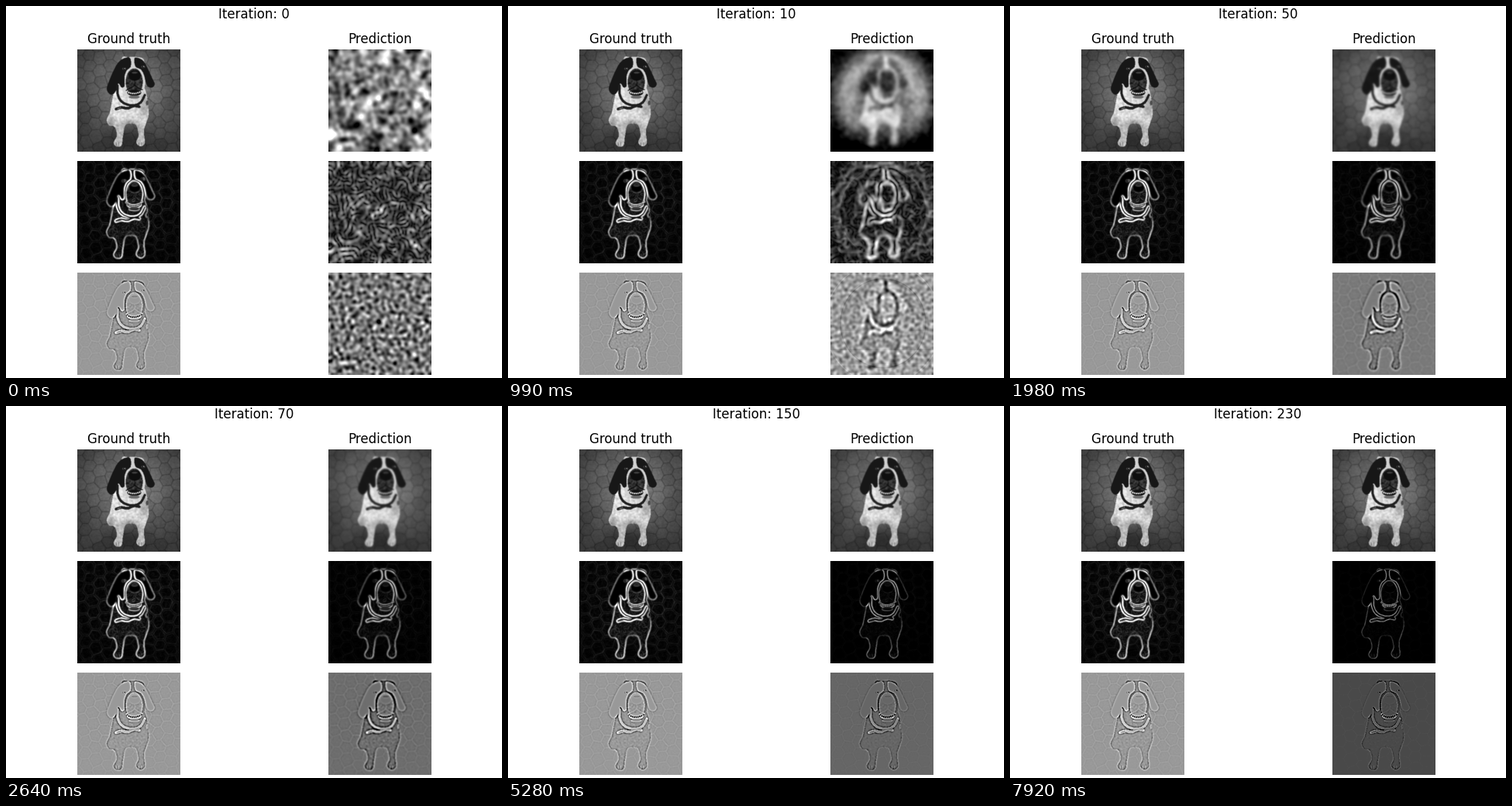
Recreate the animation shown at these times as a matplotlib script. Size 640x480 px, loop 8000 ms.

```python
import numpy as np
import matplotlib.pyplot as plt
from matplotlib.animation import FuncAnimation
from matplotlib.path import Path

W, H, LOOP, INTERVAL, STEP = 640, 480, 8000, 40, 330
N, SIDE = 264, 133          # samples and picture units per side
UNIT = N / SIDE
rng = np.random.default_rng(7)
axis = (np.arange(N) + 0.5) / UNIT
X, Y = np.meshgrid(axis, axis)
GRID = np.column_stack([X.ravel(), Y.ravel()])


def blur(a, sigma):
    """Gaussian blur, sigma in picture units, mirrored at the borders."""
    pad = 30
    b = np.pad(a, pad, mode="reflect")
    f = np.fft.fftfreq(b.shape[0])
    k = np.exp(-2 * (np.pi * f * sigma * UNIT) ** 2)
    b = np.fft.ifft2(np.fft.fft2(b) * np.outer(k, k)).real
    return b[pad:-pad, pad:-pad]


def noise(sigma):
    n = blur(rng.standard_normal((N, N)), sigma)
    return n / n.std()


def smooth(points, closed=True, steps=8):
    """Catmull-Rom curve through the points."""
    p = np.array(points, float)
    p = np.vstack([p[-1:], p, p[:2]]) if closed else np.vstack([p[:1], p, p[-1:]])
    t = np.linspace(0, 1, steps, endpoint=False)[:, None]
    parts = [b + 0.5 * t * (c - a + t * (2 * a - 5 * b + 4 * c - d
                                         + t * (3 * (b - c) + d - a)))
             for a, b, c, d in zip(p, p[1:], p[2:], p[3:])]
    return np.vstack(parts + [p[-2:-1]])


def region(points):
    return Path(smooth(points)).contains_points(GRID).reshape(N, N)


def oval(cx, cy, rx, ry):
    return ((X - cx) / rx) ** 2 + ((Y - cy) / ry) ** 2 < 1


def stroke(points, width):
    near = np.full((N, N), 1e9)
    for x, y in smooth(points, closed=False):
        near = np.minimum(near, (X - x) ** 2 + (Y - y) ** 2)
    return near < (width / 2) ** 2


def paving():
    """Irregular stones with dark joints under a vignette."""
    i, j = np.meshgrid(np.arange(-9, 14), np.arange(-9, 14))
    u = (i + 0.5 * (j % 2)) * 16 + rng.uniform(-3, 3, i.shape)
    v = j * 13 + rng.uniform(-2, 2, i.shape)
    c, s = np.cos(0.45), np.sin(0.45)
    px, py = (c * u - s * v).ravel(), (s * u + c * v).ravel()
    keep = (abs(px - 66) < 90) & (abs(py - 66) < 90)
    px, py = px[keep], py[keep]
    d = np.sqrt((X[..., None] - px) ** 2 + (Y[..., None] - py) ** 2)
    shade = rng.uniform(0.92, 1.08, px.size)[d.argmin(-1)]
    d = np.partition(d, 1, axis=-1)
    joint = np.exp(-((d[..., 1] - d[..., 0]) / 1.1) ** 2)
    light = 0.19 + 0.3 * np.exp(-((X - 70) / 62) ** 2 - ((Y - 52) / 58) ** 2)
    return light * (shade - 0.28 * joint + 0.035 * noise(0.6))


def paint_dog(img):
    speckle = noise(0.8)
    img *= 1 - 0.35 * np.exp(-((X - 68) / 26) ** 2 - ((Y - 118) / 16) ** 2)
    body = region([(50, 46), (46, 62), (42, 82), (38, 92), (41, 99), (48, 101),
                   (51, 112), (47, 121), (50, 126), (57, 125), (59, 113),
                   (62, 99), (69, 97), (76, 99), (79, 112), (76, 121),
                   (81, 126), (87, 122), (86, 106), (89, 96), (92, 85),
                   (91, 70), (86, 50), (70, 40)])
    coat = 0.87 - 0.2 * np.exp(-((X - 89) / 9) ** 2 - ((Y - 74) / 16) ** 2)
    coat -= 0.14 * np.clip((Y - 88) / 16, 0, 1)
    coat -= 0.3 * np.exp(-((X - 68) / 9) ** 2 - ((Y - 101) / 7) ** 2)
    coat -= 0.25 * np.exp(-((X - 43) / 5) ** 2 - ((Y - 95) / 7) ** 2)
    img[body] = (coat + 0.045 * speckle)[body]
    for x in (50, 53.5, 79.5, 83):
        img[stroke([(x, 121), (x, 125)], 0.7)] = 0.3
    img[oval(90, 70, 1.6, 3)] = 0.3

    img[region([(57, 14), (66, 11), (78, 11), (86, 15), (88, 38), (86, 53),
                (80, 63), (66, 63), (58, 52)])] = 0.82
    img[region([(68, 12), (59, 13), (52, 19), (46, 30), (41, 42), (38, 52),
                (41, 58), (46, 59), (50, 54), (53, 45), (57, 50), (61, 48),
                (61, 36), (64, 28), (69, 23)])] = 0.09
    img[region([(74, 12), (83, 14), (88, 20), (93, 30), (98, 41), (100, 46),
                (97, 50), (91, 49), (88, 42), (86, 34), (82, 27),
                (75, 23)])] = 0.09
    for x, y in ((60.5, 26), (85, 23.5)):
        img[oval(x, y, 2.6, 1.5)] = 0.27
        img[oval(x, y, 1.2, 1.2)] = 0.03
        img[oval(x + 0.5, y - 0.5, 0.6, 0.6)] = 0.85

    muzzle = oval(73.5, 43, 11, 17.5)
    img[muzzle] = (0.2 + 0.05 * speckle)[muzzle]
    img[oval(74, 34.5, 8, 7)] = 0.06
    img[oval(74, 31, 4, 1.2)] = 0.24
    img[stroke([(74, 40), (74, 47), (68, 51), (63, 54)], 1.1)] = 0.04
    img[stroke([(74, 47), (79, 51), (84, 53)], 1.1)] = 0.04
    img[oval(73.5, 57, 9, 4)] = 0.07
    for x in np.linspace(66.5, 80.5, 7):
        img[oval(x, 56.4 + 0.03 * (x - 73) ** 2 * -1 + 1.5, 0.95, 1.1)] = 0.92
    img[oval(73.5, 62.5, 7, 2.2)] = 0.42

    img[stroke([(52, 48), (52, 58), (56, 67), (64, 72), (74, 73), (82, 69),
                (87, 60)], 3.2)] = 0.12
    img[stroke([(50, 78), (57, 76), (65, 77), (73, 74), (80, 75)], 3.6)] = 0.13
    img[stroke([(52, 77.6), (56, 76.4)], 0.9)] = 0.6
    return img


def slope(a):
    gy, gx = np.gradient(a)
    return np.hypot(gx, gy)


def laplace(a):
    gy, gx = np.gradient(a)
    return np.gradient(gy)[0] + np.gradient(gx)[1]


def unit(a):
    return a / np.percentile(abs(a[3:-3, 3:-3]), 99.8)


def contrast(a, power):
    return np.sign(a) * abs(a) ** power


photo = np.clip(blur(paint_dog(paving()), 0.3), 0, 1)
truth = [photo,
         1.05 * unit(slope(blur(photo, 0.75))) ** 0.95,
         0.6 + 0.5 * contrast(unit(laplace(blur(photo, 0.5))), 1.15)]

static = noise(2.7) + 0.45 * noise(5)
start = [0.5 + 0.19 * static, 0.8 * unit(slope(static)),
         0.46 + 0.5 * unit(laplace(static))]
ripple = noise(2.2)
radius = np.hypot(X - 68, (Y - 66) * 0.95)
halo = 0.3 * np.exp(-((radius - 47) / 15) ** 2) * np.clip((125 - Y) / 50, 0, 1)
halo -= 0.22 * np.clip((radius - 55) / 20, 0, 1)
halo -= 0.14 * np.clip((Y - 100) / 20, 0, 1)

KEYS = [10, 20, 30, 70, 110, 150, 230]


def prediction(it):
    if it == 0:
        return start

    def at(*values):
        return np.interp(it, KEYS, values)

    guess = blur(photo, at(2.5, 1.9, 1.45, 0.9, 0.65, 0.48, 0.3))
    guess = guess + at(1, 0.3, 0, 0, 0, 0, 0) * halo
    guess = guess + at(0.035, 0.017, 0.008, 0.002, 0, 0, 0) * ripple
    edges = at(0.95, 0.85, 0.78, 0.72, 0.7, 0.68, 0.66) * contrast(
        unit(slope(guess)), at(1, 1, 1.05, 1.15, 1.25, 1.4, 1.6))
    bends = at(0.6, 0.56, 0.53, 0.43, 0.49, 0.4, 0.29) + at(
        0.48, 0.48, 0.48, 0.48, 0.48, 0.5, 0.5) * contrast(
        unit(laplace(guess)), at(1, 1, 1.05, 1.15, 1.25, 1.45, 1.7))
    return [guess, edges, bends]


fig = plt.figure(figsize=(W / 100, H / 100), dpi=100, facecolor="white")
plt.rcParams["font.family"] = "DejaVu Sans"


def column(left, title, pictures):
    shown = []
    for top, picture in zip((56, 200, 344), pictures):
        ax = fig.add_axes([left / W, 1 - (top + 132) / H, 133 / W, 132 / H])
        ax.axis("off")
        shown.append(ax.imshow(picture, cmap="gray", vmin=0, vmax=1,
                               aspect="auto"))
        if top == 56:
            ax.set_title(title, fontsize=12)
    return shown


column(92, "Ground truth", truth)
images = column(416, "Prediction", start)
heading = fig.text(0.5, 1 - 16 / H, "", fontsize=12, ha="center", va="baseline")
stages = [prediction(10 * k) for k in range(LOOP // STEP)]


def update(frame):
    now = (frame + 0.5) * INTERVAL
    stage = max(0, int(now // STEP) - 1)
    heading.set_text(f"Iteration: {10 * stage}")
    for image, picture in zip(images, stages[stage]):
        image.set_data(picture)
    return [heading, *images]


anim = FuncAnimation(fig, update, frames=LOOP // INTERVAL, interval=INTERVAL,
                     repeat=True, repeat_delay=0, blit=False)
plt.show()
```
